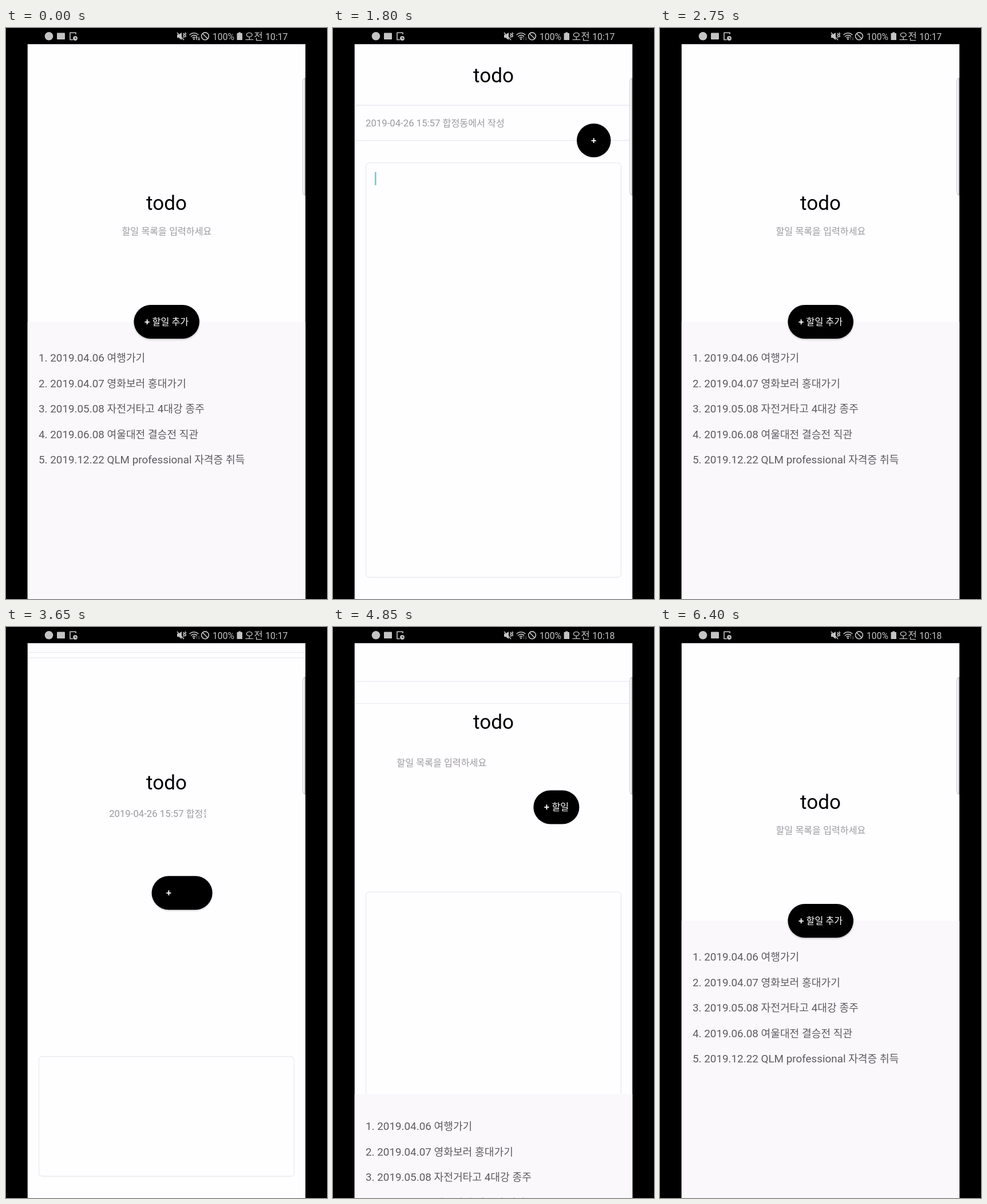
An HTML page that plays this animation: 561 by 998 pixels, repeating every 6500 ms.

```html
<!DOCTYPE html>
<html lang="ko">
<head>
<meta charset="utf-8">
<title>todo</title>
<style>
  html, body { margin: 0; width: 100%; height: 100%; overflow: hidden; background: #000; }
  svg { display: block; width: 100%; height: 100%; }
  text { font-family: Roboto, "Noto Sans CJK KR", "Noto Sans CJK", sans-serif; white-space: pre; }
  .ko { font-size: .965em; }
  .sub { font-size: 16.75px; fill: #9c9a9e; }
  .btn { font-size: 16.75px; font-weight: 500; fill: #fff; }
  .list { font-size: 18.84px; fill: #5d5b5f; }
  .line { fill: none; stroke: #ebeaf0; stroke-width: 1.3; }
  .status { fill: #c4c4c4; }
  .stroke { fill: none; stroke: #c4c4c4; stroke-width: 1.6; }
</style>
</head>
<body>
<svg viewBox="0 0 561 998">
  <defs>
    <clipPath id="screen"><rect x="37.75" y="28.3" width="485.5" height="970"/></clipPath>
    <clipPath id="subClip"><rect id="subBox" height="30"/></clipPath>
    <clipPath id="btnClip"><rect id="btnBox" height="59"/></clipPath>
    <filter id="blur" x="-20%" y="-30%" width="140%" height="170%"><feGaussianBlur stdDeviation="1.6"/></filter>
  </defs>
  <rect width="561" height="998"/>

  <g clip-path="url(#screen)">
    <rect x="37" y="28" width="487" height="970" fill="#fefdff"/>
    <g id="rules">
      <path id="rule1" class="line" d="M39 0H522"/>
      <path id="rule2" class="line" d="M39 0H522"/>
    </g>
    <rect id="box" class="line" x="57.5" width="446" rx="6"/>
    <rect id="caret" x="73" width="2.6" height="23" fill="#84c4c8"/>
    <g id="panel">
      <rect id="panelBg" x="37" width="487" height="490" fill="#faf8fb"/>
      <g id="list" class="list"></g>
    </g>
    <text id="title" x="280.5" text-anchor="middle" font-size="35.1">todo</text>
    <g clip-path="url(#subClip)">
      <text id="hint" class="sub"></text>
      <text id="stamp" class="sub"></text>
    </g>
    <rect id="shadow" height="59" rx="29.5" filter="url(#blur)"/>
    <rect id="btn" height="59" rx="29.5"/>
    <text id="plusOnly" class="btn" text-anchor="middle">+</text>
    <g clip-path="url(#btnClip)">
      <text id="addLabel" class="btn"></text>
    </g>
    <path d="M523 87Q519 88 519 93V287Q519 292 523 293" fill="#fefdff" stroke="#b9b9bc"/>
    <rect x="522" y="88" width="2" height="204" fill="#808080"/>
  </g>

  <g class="status">
    <circle cx="75" cy="14.3" r="7.3"/>
    <rect x="89" y="8.5" width="14" height="11.5" rx="1"/>
    <path class="stroke" d="M122 11V8.3H112V20.5H117"/>
    <circle cx="121" cy="18" r="3.9"/>
    <path d="M121 15.8V18.3H123" fill="none" stroke="#000"/>
    <path d="M299 11.5H302L307 8V21L302 17H299Z"/>
    <path class="stroke" d="M299 8L311 21" stroke-width="1.4"/>
    <path class="stroke" d="M310 9l1.6 2-1.6 2 1.6 2-1.6 2M313 8l1.4 2-1.4 2 1.4 2-1.4 2" stroke-width="1.1"/>
    <path class="stroke" d="M320.5 12Q328.5 5.5 336.5 12M323 15Q328.5 10.5 334 14.5M325.7 17.5Q328.5 15 331 17"/>
    <circle cx="328.5" cy="19.5" r="1.4"/>
    <path id="arrows" d="M333.2 14.5l2 2.8h-1.3V21h-1.4v-3.7h-1.3zM337.2 22l-2-2.8h1.3V15.5h1.4v3.7h1.3z"/>
    <circle class="stroke" cx="348" cy="14.3" r="6.4"/>
    <path class="stroke" d="M343.5 9.8L352.5 18.8"/>
    <text x="361" y="20.5" font-size="15.7">100%</text>
    <path d="M406.3 7.5H410.3V9H413V21H403.6V9H406.3Z"/>
    <text x="417.5" y="20.5" font-size="17">오전</text>
    <text id="clock" x="492.5" y="20.5" font-size="15.8" text-anchor="end"></text>
  </g>
</svg>

<script>
const LOOP = 6500, STEP = 50;

// Each move: tap time, start and end of the slide, state it leads to (1 = editor).
const MOVES = [
  { tap: 650, from: 912, to: 1100, goal: 1 },
  { tap: 2250, from: 2350, to: 2710, goal: 0 },
  { tap: 3450, from: 3581, to: 3850, goal: 1 },
  { tap: 4650, from: 4742, to: 5000, goal: 0 }
];

const TODOS = [
  "1. 2019.04.06 여행가기",
  "2. 2019.04.07 영화보러 홍대가기",
  "3. 2019.05.08 자전거타고 4대강 종주",
  "4. 2019.06.08 여울대전 결승전 직관",
  "5. 2019.12.22 QLM professional 자격증 취득"
];

const $ = id => document.getElementById(id);
const clamp = v => Math.max(0, Math.min(1, v));
const lerp = (a, b, p) => a + (b - a) * p;
const ease = x => (1 - Math.cos(Math.PI * clamp(x))) / 2;
const within = (t, a, b) => t >= a && t < b;

function set(id, attrs) {
  for (const key in attrs) $(id).setAttribute(key, attrs[key]);
}

function show(id, on) {
  $(id).setAttribute("visibility", on ? "visible" : "hidden");
}

// Hangul is set slightly smaller than the Latin text around it.
function write(el, text) {
  el.innerHTML = text.replace(/[가-힣]+/g, '<tspan class="ko">$&</tspan>');
}

write($("hint"), "할일 목록을 입력하세요");
write($("stamp"), "2019-04-26 15:57 합정동에서 작성");
write($("addLabel"), "+ 할일 추가");

TODOS.forEach((todo, i) => {
  const row = document.createElementNS("http://www.w3.org/2000/svg", "text");
  write(row, todo);
  row.setAttribute("x", 57);
  row.setAttribute("y", 583 + i * 44.5);
  $("list").append(row);
});

function stateAt(t) {
  const move = MOVES.filter(m => t >= m.tap).pop();
  if (!move) return { editing: false, p: 0, listAlpha: 1 };
  const q = ease((t - move.from) / (move.to - move.from));
  const editing = move.goal === 1;
  const fade = clamp((t - move.tap) / (move.from - move.tap));
  return { editing, p: editing ? q : 1 - q, listAlpha: editing ? 1 - fade : 1 };
}

function draw(time) {
  const t = Math.floor(time / STEP) * STEP;
  const { editing, p, listAlpha } = stateAt(t);

  set("title", { y: lerp(318, 94.5, p) });

  const subX = lerp(202.5, 57, p), subY = lerp(361, 172, p);
  set("subBox", { x: subX, y: subY - 20, width: lerp(156, 243, p) });
  set("hint", { x: subX, y: subY });
  set("stamp", { x: subX, y: subY });
  show("hint", !editing);
  show("stamp", editing);

  const x = lerp(223.5, 426, p), y = lerp(484, 167, p), width = lerp(114.5, 59.5, p);
  set("btn", { x, y, width });
  set("shadow", { x, y: y + 1.5, width, opacity: 0.25 * clamp(1 - p / 0.6) });
  set("btnBox", { x: x + 18, y, width: width - 36 });
  set("addLabel", { x: x + 18.5, y: y + 35 });
  set("plusOnly", { x: x + 29.7, y: y + 35 });
  show("addLabel", !editing);
  show("plusOnly", editing);

  show("rules", p > 0);
  set("rule1", { transform: `translate(0 ${lerp(28, 135, p)})` });
  set("rule2", { transform: `translate(0 ${lerp(28, 196.5, p)})` });

  const boxY = lerp(844.3, 235.7, p);
  set("box", { y: boxY, height: 960 - boxY });
  set("caret", { y: boxY + 16 });
  show("caret", within(t, 1800, 2750) || within(t, 4250, 4750));

  set("panel", { opacity: listAlpha });
  set("panelBg", { y: lerp(513.7, 997, p) });
  set("list", { transform: `translate(0 ${472.5 * p})` });

  set("arrows", { opacity: within(t, 400, 5400) || t >= 6400 ? 0.35 : 1 });
  $("clock").textContent = t < 4350 ? "10:17" : "10:18";
}

const origin = performance.now();
function tick() {
  draw((performance.now() - origin) % LOOP);
  requestAnimationFrame(tick);
}
tick();
</script>
</body>
</html>
```
